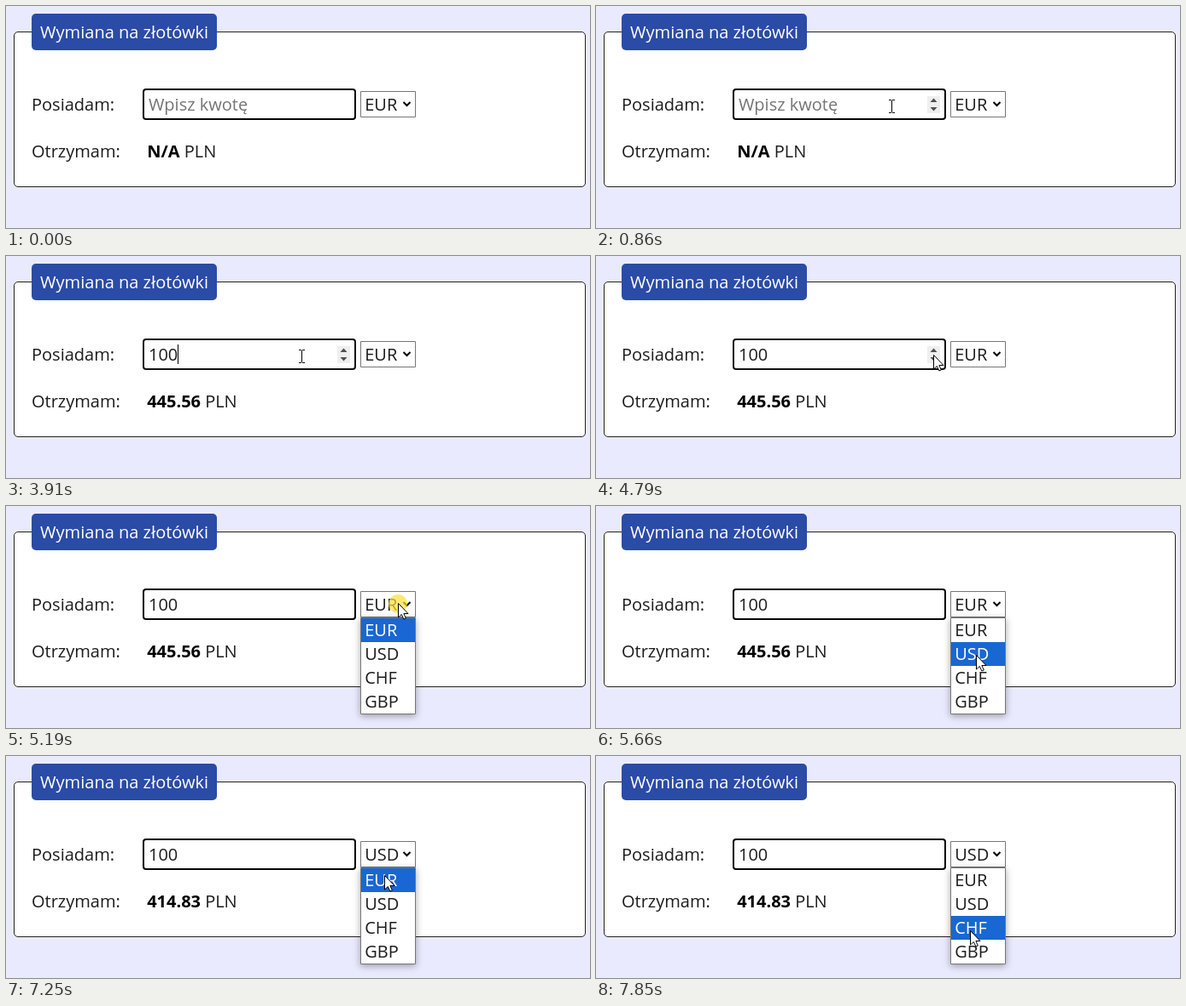
Animation, 684 px wide and 261 px high, one loop 8000 ms. Source, as an HTML page with a canvas:

```html
<!DOCTYPE html>
<html lang="pl">
<head>
<meta charset="utf-8">
<title>Wymiana na złotówki</title>
<style>
  html, body { margin: 0; width: 100%; height: 100%; overflow: hidden; background: #eaeafe; }
  canvas { display: block; }
</style>
</head>
<body>
<canvas id="stage" width="684" height="261"></canvas>
<script>
const ctx = document.getElementById('stage').getContext('2d');
const LOOP = 8000, TICK = 66.5, BLINK = 530;
const INK = '#1c1c1c', LINE = 27, DIGIT = 11.44;
const RATES = { EUR: 4.4556, USD: 4.1483, CHF: 4.2, GBP: 5.2 };
const ROW_TOP = 132, ROW_HEIGHT = 28;

// Story: type an amount, pick a currency, open the list again
const CLICK = { down: 1060, up: 1130 };
const OPEN = { down: 5190, up: 5250 };
const PICK = { down: 5990, up: 6120 };
const REOPEN = { down: 7060, up: 7130 };
const KEYS = [{ at: 2320, key: '1' }, { at: 3320, key: '0' }, { at: 3910, key: '0' }];

const rowPoint = (i, x) => ({ x, y: ROW_TOP + ROW_HEIGHT * i + 18 });
const START = { x: 585, y: 237 };
const MOVES = [
  { from: 70, until: 860, to: { x: 346, y: 118 } },
  { from: 4580, until: 5050, to: { x: 460, y: 115 } },
  { from: 5390, until: 5660, to: rowPoint(1, 446) },
  { from: 6525, until: 6720, to: { x: 446, y: 131 } },
  { from: 6925, until: 6990, to: { x: 446, y: 118 } },
  { from: 7130, until: 7590, to: rowPoint(2, 439) }
];

const clamp = v => Math.min(1, Math.max(0, v));

function pointerAt(t) {
  const sampled = Math.floor((t + 14) / TICK) * TICK;
  let { x, y } = START;
  for (const { from, until, to } of MOVES) {
    const p = clamp((sampled - from) / (until - from));
    x += (to.x - x) * p;
    y += (to.y - y) * p;
  }
  return { x: Math.round(x), y: Math.round(y) };
}

function text(str, x, y, color = INK, weight = 400) {
  ctx.font = `${weight} 20px "Open Sans", sans-serif`;
  ctx.fillStyle = color;
  ctx.fillText(str, x, y);
  return ctx.measureText(str).width;
}

function box(x, y, w, h, radius, fill, stroke, lineWidth = 1) {
  const half = stroke ? lineWidth / 2 : 0;
  ctx.beginPath();
  ctx.roundRect(x + half, y + half, w - 2 * half, h - 2 * half, Math.max(0, radius - half));
  ctx.fillStyle = fill;
  ctx.fill();
  if (stroke) { ctx.strokeStyle = stroke; ctx.lineWidth = lineWidth; ctx.stroke(); }
}

// Arrow head centred on x; a negative height points up
function chevron(x, y, halfWidth, height) {
  ctx.beginPath();
  ctx.moveTo(x - halfWidth, y);
  ctx.lineTo(x, y + height);
  ctx.lineTo(x + halfWidth, y);
}

function drawInput(t, amount, hovered) {
  const focused = t >= CLICK.down && t < OPEN.down;
  box(160, 97, 250, 37, 4, '#fff', focused ? '#101010' : '#000', 2);
  if (amount) text(amount, 167, 123);
  else text('Wpisz kwotę', 167, 123, '#757575');

  const lastInput = KEYS.findLast(k => k.at <= t)?.at ?? CLICK.down;
  if (focused && Math.floor((t - lastInput) / BLINK) % 2 === 0) {
    ctx.fillStyle = '#000';
    ctx.fillRect(Math.floor(167 + DIGIT * amount.length), 104, 1, 23);
  }
  if (focused || hovered) {
    box(388, 106, 15, 20, 0, '#efefef');
    ctx.fillStyle = '#505050';
    for (const side of [-1, 1]) {
      chevron(395.5, 116 + 3 * side, 4, 4.5 * side);
      ctx.fill();
    }
  }
}

function drawSelect(currency, ringed) {
  box(415, 100, 65, 31, ringed ? 3 : 0, '#fff', ringed ? '#101010' : '#767676', ringed ? 2 : 1);
  text(currency, 420.2, 123);
  chevron(469.5, 113, 4, 4);
  ctx.strokeStyle = '#000';
  ctx.lineWidth = 2;
  ctx.stroke();
}

function drawList(currency, pointerY) {
  const names = Object.keys(RATES);
  const hoveredRow = Math.floor((pointerY - ROW_TOP) / ROW_HEIGHT);
  const active = names[hoveredRow] ?? currency;
  ctx.save();
  ctx.shadowColor = 'rgba(0,0,0,.35)';
  ctx.shadowBlur = 8;
  ctx.shadowOffsetY = 2;
  box(415, 131, 65, 114, 0, '#fff');
  ctx.restore();
  box(415, 131, 65, 114, 0, '#fff', '#767676');
  names.forEach((name, i) => {
    const y = ROW_TOP + i * ROW_HEIGHT;
    if (name === active) box(416, y, 63, ROW_HEIGHT, 0, '#1967d2');
    text(name, 420.2, y + 21, name === active ? '#fff' : INK);
  });
}

function drawIBeam(x, y) {
  ctx.fillStyle = '#000';
  ctx.fillRect(x, y - 7, 1, 14);
  for (const dy of [-8, 7]) {
    ctx.fillRect(x - 3, y + dy, 3, 1);
    ctx.fillRect(x + 1, y + dy, 3, 1);
  }
}

function drawArrow(x, y) {
  ctx.save();
  ctx.translate(x - .5, y - .5);
  const shape = new Path2D('M0 0V16.5L3.8 13L6.4 18.5L8.8 17.5L6.4 12H11.5Z');
  ctx.fillStyle = '#fff';
  ctx.fill(shape);
  ctx.strokeStyle = '#000';
  ctx.lineWidth = 1;
  ctx.stroke(shape);
  ctx.restore();
}

function draw(t) {
  const pointer = pointerAt(t);
  const hovered = pointer.x < 410 && pointer.y > 97 && pointer.y < 134;
  const open = (t >= OPEN.down && t < PICK.up) || t >= REOPEN.down;
  const amount = KEYS.filter(k => k.at <= t).map(k => k.key).join('');
  const currency = t < PICK.up ? 'EUR' : 'USD';

  box(0, 0, 684, 261, 0, '#eaeafe');
  box(9, 30, 670, 183, 5, '#fff', '#222');
  box(30, 9, 217, 43, 5, '#2a4ba6');
  text('Wymiana na złotówki', 40, 38, '#fff');
  text('Posiadam:', 30, 123);
  text('Otrzymam:', 30, 178);
  const result = amount ? (amount * RATES[currency]).toFixed(2) : 'N/A';
  const width = text(result, 165.2, 178, '#000', 700);
  text('PLN', 165.2 + width + 5.2, 178);

  drawInput(t, amount, hovered);
  drawSelect(currency, t >= PICK.up && !open);
  if (open) drawList(currency, pointer.y);

  if (t < MOVES[0].from) return;
  if ([CLICK, OPEN, PICK, REOPEN].some(c => t >= c.down && t < c.up)) {
    box(pointer.x - 12, pointer.y - 11, 22, 22, 11, 'rgba(250,225,50,.7)');
  }
  if (hovered && pointer.x < 387) drawIBeam(pointer.x, pointer.y);
  else drawArrow(pointer.x, pointer.y);
}

const start = performance.now();
function tick() {
  draw((performance.now() - start) % LOOP);
  requestAnimationFrame(tick);
}
tick();
</script>
</body>
</html>
```
